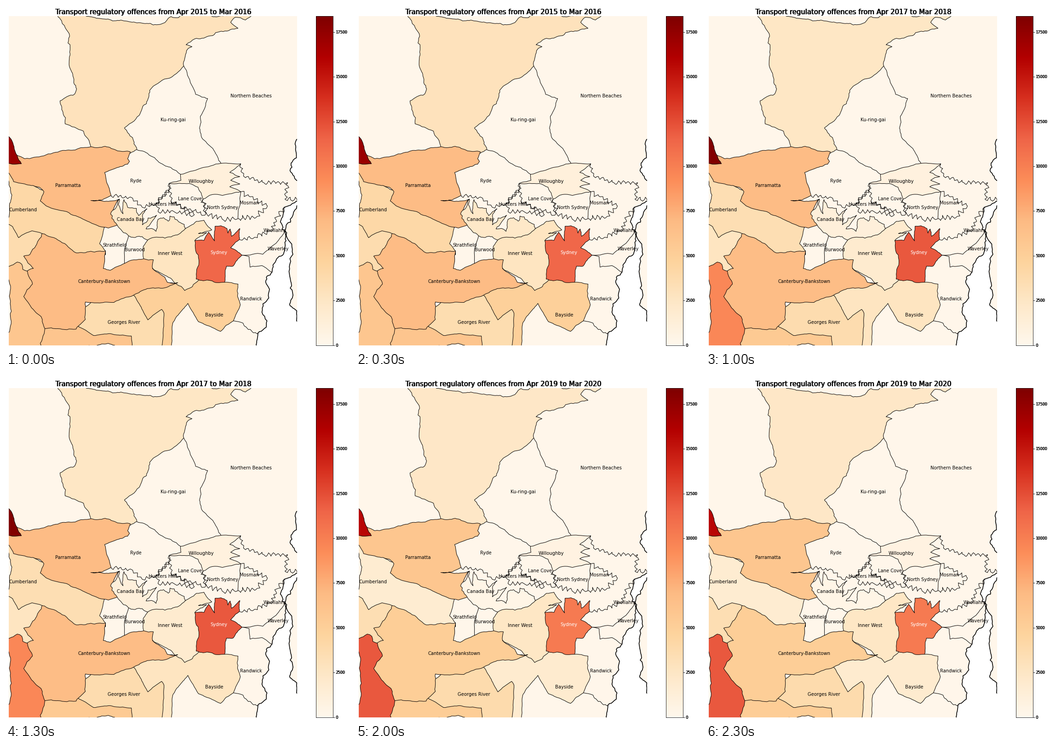
Animation of 748x749 px, one loop 2500 ms. Source, as a matplotlib script:

```python
import numpy as np
import matplotlib.pyplot as plt
from matplotlib.animation import FuncAnimation
from matplotlib.patches import Polygon

W, H, DPI = 748, 749, 64
PT = 72 / DPI  # points per pixel
VMAX = 18393
CMAP = plt.get_cmap("OrRd")
plt.rcParams["font.family"] = "DejaVu Sans"
rng = np.random.default_rng(7)
fig = plt.figure(figsize=(W / DPI, H / DPI), dpi=DPI, facecolor="white")


def pixel_axes(x0, y0, x1, y1):
    """Axes over a pixel box, with data units equal to stage pixels."""
    ax = fig.add_axes([x0 / W, 1 - y1 / H, (x1 - x0) / W, (y1 - y0) / H])
    ax.set_xlim(x0 - 0.5, x1 - 0.5)
    ax.set_ylim(y1 - 0.5, y0 - 0.5)
    return ax


def shade(value):
    return CMAP(min(value / VMAX, 1.0))


def split(a, b, k):
    """Midpoint displacement from a to b, without the end point."""
    d = b - a
    length = np.hypot(*d)
    if length < 6:
        return [a]
    mid = (a + b) / 2 + np.array([-d[1], d[0]]) * rng.normal(0, k)
    return split(a, mid, k) + split(mid, b, k)


def rough(pts, k):
    out = []
    for a, b in zip(pts, pts[1:]):
        out += split(a, b, k)
    return np.array(out + [pts[-1]])


def inlets(pts, depth, step=5):
    """Turn a shore into alternating heads and coves."""
    out = []
    for a, b in zip(pts, pts[1:]):
        d = b - a
        length = np.hypot(*d)
        n = max(2, int(length / step))
        t = np.arange(n)[:, None] / n
        side = np.where(np.arange(n) % 2, 1, -1) * rng.uniform(0.3, 1, n)
        side[0] = 0
        out.append(a + d * t
                   + side[:, None] * np.array([-d[1], d[0]]) / length * depth)
    return rough(np.vstack(out + [pts[-1:]]), 0.1)


def points(xy):
    return np.array(xy, float).reshape(-1, 2)


ax = pixel_axes(6, 22, 633, 738.5)
ax.set_facecolor(shade(200))
ax.set(xticks=[], yticks=[])
ax.spines[:].set_visible(False)
areas = []


def area(values, *xy, k=0.05, lw=1):
    """Add a filled district; later ones cover the edges of earlier ones."""
    pts = points(xy)
    patch = Polygon(rough(np.vstack([pts, pts[:1]]), k), closed=True,
                    ec="black", fc="white", lw=lw * PT, joinstyle="round")
    patch.set_zorder(1 + len(ax.patches) / 100)
    ax.add_patch(patch)
    if values:
        areas.append((patch, values))


def border(*xy, k=0.05, depth=0):
    pts = points(xy)
    pts = inlets(pts, depth) if depth else rough(pts, k)
    ax.plot(*pts.T, color="black", lw=PT, zorder=2)


# open sea
area(None, 640, 421, 604, 438, 608, 500, 588, 550, 578, 579, 564, 600,
     571, 635, 556, 666, 567, 685, 547, 712, 548, 745, 640, 745,
     k=0.12, lw=1.6)
area(None, 640, 285, 628, 300, 631, 330, 617, 358, 626, 370, 640, 385,
     k=0.14, lw=1.6)
# Hornsby
area((3000, 3150, 2500, 2400, 2400),
     108, 15, 137, 60, 138, 100, 145, 152, 153, 180, 149, 191, 117, 206,
     128, 256, 168, 272, 184, 306, 220, 320, 270, 320, 284, 312, 257, 265,
     278, 250, 305, 212, 312, 183, 386, 130, 392, 97, 404, 88, 391, 84,
     410, 71, 440, 65, 504, 48, 488, 35, 498, 24, 520, 30, 560, 15, k=0.07)
# Fairfield
area((3700, 3900, 2700, 3900, 3500),
     0, 465, 60, 475, 90, 505, 70, 580, 0, 590)
# Sutherland
area((6000, 4900, 5600, 5200, 5300),
     70, 690, 160, 680, 290, 700, 290, 745, 70, 745)
# Liverpool
area((5900, 7900, 9500, 11200, 12000),
     0, 572, 24, 557, 34, 562, 36, 573, 70, 600, 95, 690, 84, 702, 77, 745,
     0, 745, k=0.07)
# Cumberland
area((4100, 2300, 3500, 2500, 1750),
     0, 350, 95, 400, 225, 470, 213, 482, 203, 517, 216, 533, 216, 541,
     152, 545, 78, 495, 56, 489, 27, 504, 14, 480, 0, 472)
# Parramatta
area((6800, 6900, 6800, 6500, 5900),
     0, 330, 22, 324, 40, 332, 122, 314, 150, 313, 184, 306, 215, 305,
     242, 315, 270, 317, 264, 332, 268, 338, 264, 344, 214, 362, 218, 382,
     228, 412, 208, 422, 184, 423, 214, 425, 246, 420, 232, 444, 243, 476,
     222, 483, 213, 481, 131, 447, 74, 424, 82, 404, 72, 394, 16, 382,
     0, 350, k=0.04)
# Blacktown
area((17200, 18393, 18300, 13900, 15800),
     0, 276, 17, 306, 33, 343, 14, 344, 0, 342)
# Canada Bay
area((2300, 1700, 1150, 550, 400),
     246, 420, 244, 432, 254, 452, 256, 421, 283, 440, 288, 456, 306, 441,
     296, 476, 327, 455, 304, 485, 326, 490, 330, 464, 352, 468, 356, 457,
     387, 475, 388, 490, 358, 508, 311, 510, 266, 500, 241, 476, 232, 444,
     k=0.1)
# Bayside
area((5000, 4200, 2700, 2400, 1900),
     270, 620, 372, 603, 410, 590, 475, 601, 504, 605, 503, 632, 509, 650,
     494, 685, 466, 708, 418, 687, 395, 647, 362, 690, 360, 745, 330, 745,
     290, 680, 265, 645, k=0.03)
# Georges River
area((3600, 3500, 3700, 3800, 3800),
     190, 640, 277, 629, 308, 683, 338, 660, 343, 668, 338, 745, 275, 745,
     272, 718, 222, 713, 190, 717, 155, 696, 165, 660, k=0.03)
# Inner West
area((2700, 2600, 1900, 2300, 2500),
     309, 508, 345, 505, 372, 498, 400, 478, 430, 466, 447, 487, 418, 495,
     436, 493, 410, 510, 430, 530, 418, 597, 388, 619, 370, 605, 310, 565,
     299, 550, 297, 530, k=0.06)
# Canterbury-Bankstown
area((6800, 7300, 6700, 6600, 5200),
     78, 495, 152, 537, 216, 533, 214, 556, 211, 571, 226, 575, 257, 560,
     299, 550, 320, 552, 318, 571, 345, 590, 350, 601, 373, 602, 340, 614,
     277, 629, 234, 645, 172, 644, 172, 682, 152, 703, 112, 702, 84, 702,
     76, 676, 62, 664, 38, 632, 57, 605, 46, 576, 59, 571, 38, 544, 51, 541,
     k=0.05)
# Sydney
area((11400, 14700, 12000, 9500, 10300),
     410, 510, 430, 510, 440, 492, 453, 511, 454, 479, 467, 478, 480, 484,
     482, 494, 487, 485, 490, 501, 508, 484, 507, 508, 488, 526, 513, 542,
     493, 566, 479, 566, 475, 601, 413, 594, 419, 553, k=0.05)
# Willoughby
area((1100, 1000, 900, 900, 750),
     379, 366, 467, 342, 510, 343, 486, 362, 508, 371, 488, 379, 508, 387,
     486, 393, 510, 404, 470, 412, 448, 410, 428, 420, 417, 394, 398, 386,
     354, 386, 380, 379, k=0.04)

# borders between pale districts
border(386, 130, 394, 150, 412, 192, 438, 201, 422, 240, 428, 290, 467, 342)
border(284, 312, 307, 320, 336, 342, 379, 366)
border(266, 500, 257, 530, 257, 560, k=0.02)
border(513, 542, 558, 540, 590, 512, 606, 488)
border(513, 542, 528, 545, 530, 568, 578, 579)
border(494, 685, 515, 690, 535, 709, 548, 713, k=0.15)
# harbour shores
border(228, 412, 275, 418, 296, 438, 326, 430, 354, 400, 354, 386, depth=4)
border(354, 386, 358, 424, 380, 437, 400, 441, 432, 455, 428, 420, depth=4)
border(354, 400, 326, 428, 330, 447, 366, 448, 409, 454, 358, 424, depth=5)
border(428, 420, 436, 452, 470, 464, 504, 462, depth=6)
border(510, 404, 504, 462, k=0.04)
border(504, 462, 545, 458, 568, 435, 530, 415, 510, 404, depth=7)
border(510, 343, 516, 370, 560, 384, 612, 384, 606, 420, 640, 421, depth=5)
border(507, 508, 540, 503, 575, 490, 590, 458, 606, 438, depth=5)

LABELS = [
    ("Northern Beaches", 532, 194.5), ("Ku-ring-gai", 362.5, 247),
    ("Ryde", 282, 379.5), ("Willoughby", 424, 380.5),
    ("Parramatta", 134, 389.5), ("Lane Cove", 400, 419),
    ("Hunters Hill", 339, 430.5), ("North Sydney", 470, 438),
    ("Mosman", 528.5, 428), ("Cumberland", 36.5, 442.5),
    ("Canada Bay", 270.5, 464), ("Woollahra", 584.5, 488),
    ("Waverley", 591, 527.5), ("Strathfield", 236.5, 520),
    ("Burwood", 279.5, 530), ("Inner West", 356, 538),
    ("Sydney", 462.5, 536), ("Canterbury-Bankstown", 213, 598.5),
    ("Randwick", 532, 637), ("Bayside", 452, 672),
    ("Georges River", 256, 687.5),
]
for name, x, y in LABELS:
    ax.text(x, y + 3.7, name, ha="center", va="baseline", size=10 * PT,
            color="white" if name == "Sydney" else "black", zorder=5)

# the heading and the scale figures are each printed twice, slightly apart
titles = [ax.text(319.4 + dx, 17, "", ha="center", va="baseline",
                  size=14.7 * PT, zorder=5) for dx in (0, 0.8)]

bar = pixel_axes(674, 22, 711, 738.5)
left, right = bar.get_xlim()
bottom, top = bar.get_ylim()
bar.imshow(np.linspace(1, 0, 256)[:, None], cmap=CMAP, aspect="auto",
           extent=(left, right, bottom, top), vmin=0, vmax=1)
bar.spines[:].set_linewidth(0.8 * PT)
marks = np.arange(0, VMAX, 2500)
heights = bottom + (top - bottom) * marks / VMAX
bar.set_xticks([])
bar.set_yticks(heights, [""] * len(marks))
bar.yaxis.tick_right()
bar.tick_params(axis="y", length=3.5 * PT, width=0.8 * PT)
for mark, y in zip(marks, heights):
    for dx in (0, 0.8):
        bar.text(716 + dx, y + 3, str(mark), va="baseline", size=8 * PT)


def draw(i):
    for patch, values in areas:
        patch.set_facecolor(shade(values[i]))
    for title in titles:
        title.set_text("Transport regulatory offences from "
                       f"Apr {2015 + i} to Mar {2016 + i}")
    return [patch for patch, _ in areas] + titles


anim = FuncAnimation(fig, draw, frames=5, interval=500, repeat=True,
                     repeat_delay=0, blit=False)
plt.show()
```
